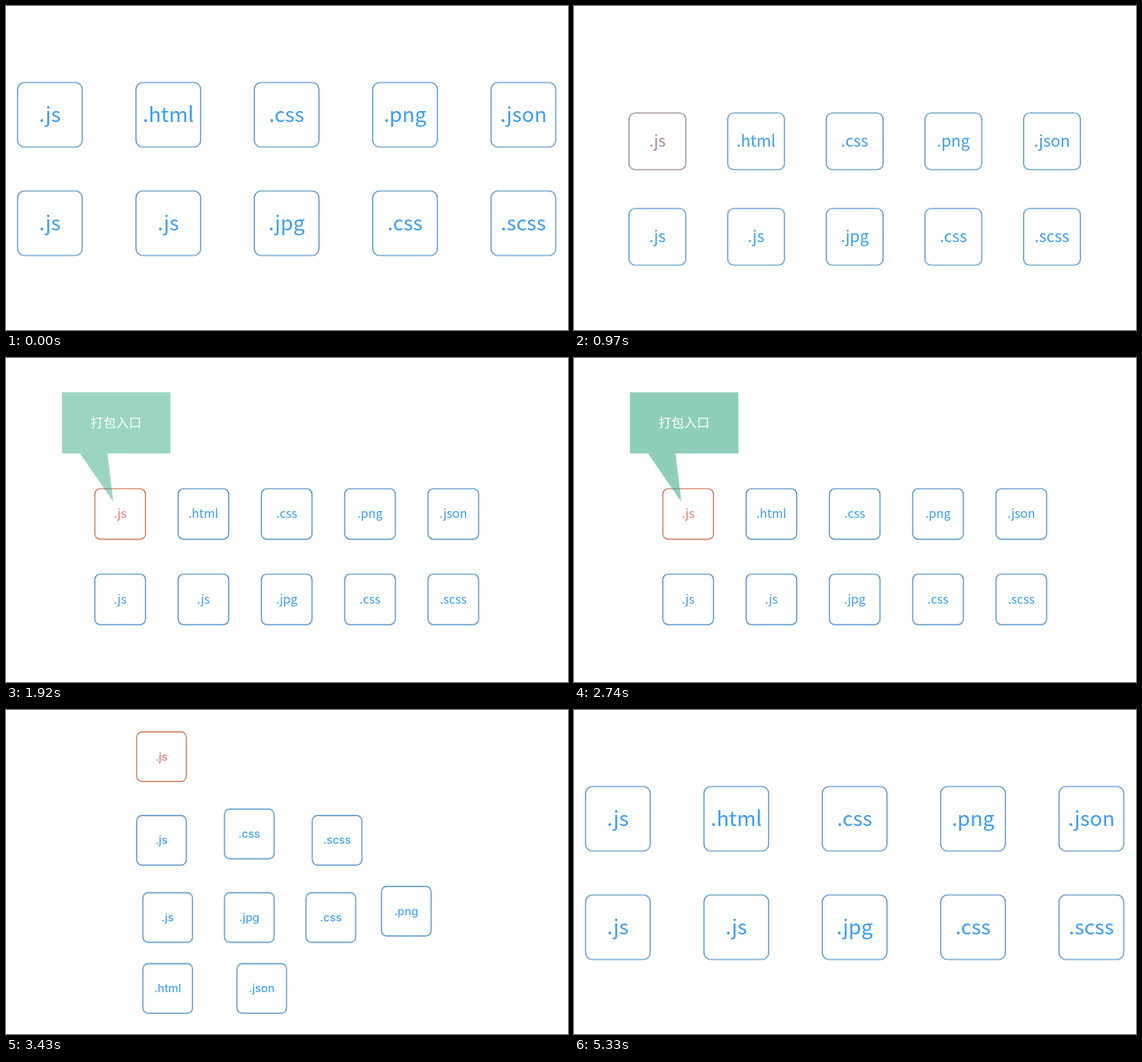
These frames come from a looping animation (817 by 472 pixels, 5.98 s). An HTML page:

```html
<!DOCTYPE html>
<html lang="zh">
<head>
<meta charset="utf-8">
<title>打包入口</title>
<style>
html, body { margin: 0; width: 100%; height: 100%; overflow: hidden; background: #fff; }
svg { position: absolute; left: 0; top: 0; width: 817px; height: 472px; }

.box, .box *, .note, .links {
  animation: 5980ms cubic-bezier(.27, .5, .5, 1) infinite;
}
.box { animation-name: move; }
.box rect { animation-name: size; fill: none; stroke: #1a6fb2; stroke-width: 1.15; }
.box text { text-anchor: middle; fill: #3d9cf0; }
.cjk { animation-name: shrink; font: 30px "Noto Sans CJK SC", "Noto Sans CJK", sans-serif; }
.sans { animation-name: swap; font: 500 16.3px Inter, sans-serif; }
.entry rect { animation-name: size, redLine; }
.entry .cjk { animation-name: shrink, redText; }
.entry .sans { fill: #f0716c; }

/* grid, compact grid, tree, then a cut back to the grid */
@keyframes move {
  0%, 10.87%, 89.13%, 100% { transform: translate(var(--a)); }
  27.59%, 46.1% { transform: translate(var(--b)); }
  62.4% { transform: translate(var(--c)); animation-timing-function: step-end; }
}
@keyframes size {
  0%, 10.87%, 89.13%, 100% { x: -47px; y: -47px; width: 94px; height: 94px; rx: 10px; }
  27.59%, 46.1% { x: -36.8px; y: -36.8px; width: 73.6px; height: 73.6px; rx: 7.8px; }
  62.4% { x: -36px; y: -36px; width: 72px; height: 72px; rx: 7.6px; animation-timing-function: step-end; }
}
@keyframes shrink {
  0%, 10.87%, 89.13%, 100% { transform: scale(1); opacity: 1; }
  27.59%, 46.1% { transform: scale(.59); opacity: 1; }
  62.4% { transform: scale(.57); opacity: 0; animation-timing-function: step-end; }
}
@keyframes swap {
  0%, 46.1%, 89.13%, 100% { opacity: 0; }
  62.4% { opacity: 1; animation-timing-function: step-end; }
}
@keyframes redLine {
  0%, 10.87%, 89.13%, 100% { stroke: #1a6fb2; }
  27.59% { stroke: #c0491f; }
  62.4% { stroke: #c0491f; animation-timing-function: step-end; }
}
@keyframes redText {
  0%, 10.87%, 89.13%, 100% { fill: #3d9cf0; }
  27.59% { fill: #f0716c; }
  62.4% { fill: #f0716c; animation-timing-function: step-end; }
}

.note { animation-name: note; animation-timing-function: linear; }
.note path { fill: #1f9e79; fill-opacity: .5; }
.note text { font: 18.5px "Noto Sans CJK SC", "Noto Sans CJK", sans-serif; fill: #fff; text-anchor: middle; }
@keyframes note {
  0%, 25.2% { opacity: 0; }
  33.1%, 46.1% { opacity: 1; }
  53%, 100% { opacity: 0; }
}

/* soft downward wipes */
.links {
  position: absolute; left: 0; width: 817px; overflow: hidden;
  animation-timing-function: linear;
  -webkit-mask: linear-gradient(#000 43.48%, transparent 56.52%) 0 100% / 100% 230% no-repeat;
}
.links path { fill: none; stroke: #2f9c85; stroke-width: .65; }
.links .tip { fill: #29987f; stroke: none; }
#l1 { top: 53px; height: 88px; animation-name: wipe1; }
#l2 { top: 212px; height: 51px; animation-name: wipe2; }
#l3 { top: 334px; height: 51px; animation-name: wipe3; }
@keyframes wipe1 {
  0%, 64.5% { -webkit-mask-position: 0 100%; }
  72.7% { -webkit-mask-position: 0 0; animation-timing-function: step-end; }
  89.13%, 100% { -webkit-mask-position: 0 100%; }
}
@keyframes wipe2 {
  0%, 72.7% { -webkit-mask-position: 0 100%; }
  80.9% { -webkit-mask-position: 0 0; animation-timing-function: step-end; }
  89.13%, 100% { -webkit-mask-position: 0 100%; }
}
@keyframes wipe3 {
  0%, 80.9% { -webkit-mask-position: 0 100%; }
  88% { -webkit-mask-position: 0 0; animation-timing-function: step-end; }
  89.13%, 100% { -webkit-mask-position: 0 100%; }
}
</style>
</head>
<body>
<svg id="stage" viewBox="0 0 817 472">
  <g id="boxes"></g>
  <g class="note">
    <path d="M81.3 50H239V139H147.5L156 209.5L107.5 139H81.3Z"/>
    <text x="160" y="101.4">打包入口</text>
  </g>
</svg>
<div class="links" id="l1"></div>
<div class="links" id="l2"></div>
<div class="links" id="l3"></div>
<script>
// label, then column and row in the tree, in grid order
const files = [
  ['.js', 0, 0], ['.html', 0, 3], ['.css', 1, 1], ['.png', 3, 2], ['.json', 1, 3],
  ['.js', 0, 1], ['.js', 0, 2], ['.jpg', 1, 2], ['.css', 2, 2], ['.scss', 2, 1]
];
const at = (x, y) => `${x.toFixed(2)}px, ${y.toFixed(2)}px`;
const col = c => 230.9 + 118.4 * c;

document.getElementById('boxes').innerHTML = files.map(([name, tc, tr], i) => {
  const c = i % 5, r = Math.floor(i / 5);
  const a = at(63.8 + 172.1 * c, 158.5 + 158 * r);
  const b = at(165.9 + 121.1 * c, 227.2 + 124.4 * r);
  const t = at(col(tc), 55.2 + 121.6 * tr);
  return `<g class="box${i ? '' : ' entry'}" style="--a:${a};--b:${b};--c:${t}">
    <rect/><text class="cjk" dy=".35em">${name}</text><text class="sans" dy=".34em">${name}</text></g>`;
}).join('');

const tip = (x, y) => `<path class="tip" d="M${x - 3.5} ${y - 6}h7l-3.5 6.5z"/>`;
// S-shaped connector; k places the bend between the two ends
const link = (x1, y1, x2, y2, k = .5) => {
  const w = x2 - x1, h = y2 - y1, m = h * k;
  return `<path d="M${x1} ${y1}c0 ${m / 2} ${w / 4} ${m} ${w / 2} ${m}s${w / 2} ${(h - m) / 2} ${w / 2} ${h - m}"/>` + tip(x2, y2);
};
const draw = (id, top, height, body) => {
  document.getElementById(id).innerHTML =
    `<svg viewBox="0 ${top} 817 ${height}" style="height:${height}px">${body}</svg>`;
};

draw('l1', 53, 88,
  link(col(0), 91, col(0), 140) + link(col(0), 91, col(1), 140) +
  '<path d="M267 55.3C367.5 55.3 467.7 98 467.7 140"/>' + tip(col(2), 140));
draw('l2', 212, 51,
  link(col(0), 213, col(0), 262) + link(col(0), 213, col(1), 262) +
  link(col(1), 213, col(1), 262) + link(col(1), 213, col(2), 262) +
  link(col(1), 213, col(3), 262, .34));
draw('l3', 334, 51,
  link(col(0), 335, col(0), 384) + link(col(0), 335, col(1), 384));
</script>
</body>
</html>
```
